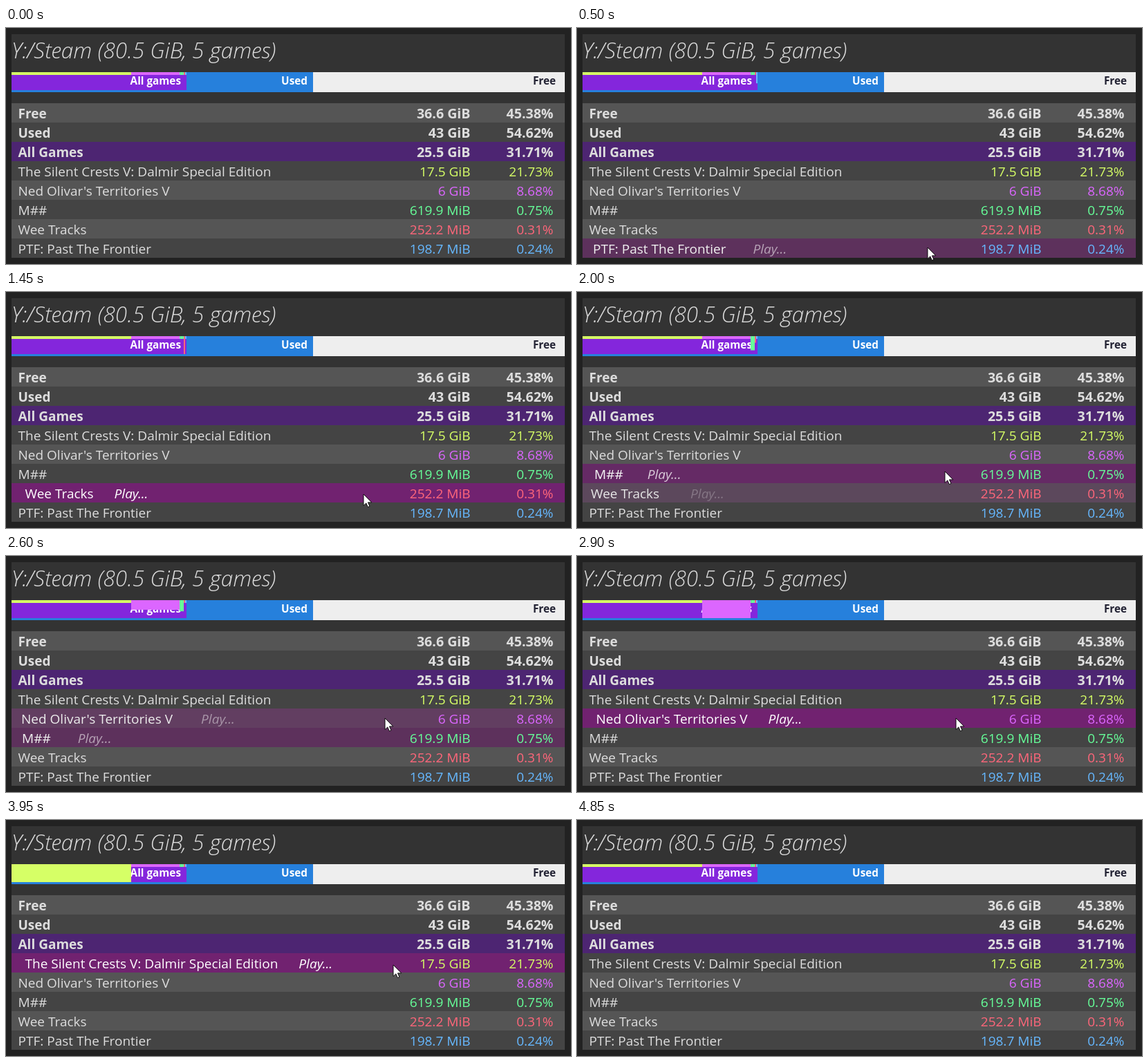
Write an HTML page that moves like this. It is 817 by 342 pixels and loops after 5.65 s.

```html
<!DOCTYPE html>
<html lang="en">
<head>
<meta charset="utf-8">
<title>Disk usage</title>
<style>
  html, body { margin: 0; width: 100%; height: 100%; overflow: hidden; background: #222; }
  svg { display: block; width: 817px; height: 342px; font: 19px "Open Sans", "Noto Sans", sans-serif; fill: #ddd; }
  .title { font-size: 31.55px; font-weight: 300; font-style: italic; }
  .bar { font-size: 15.3px; font-weight: 700; fill: #fff; }
  .total { font-weight: 700; }
  .total.end { font-size: 19.6px; }
  .end { text-anchor: end; }
  .play { font-style: italic; fill: #fff; }
</style>
</head>
<body>
<svg id="stage" viewBox="0 0 817 342"></svg>
<script>
const LOOP = 5650, STEP = 50, FADE = 500;
const ROW_TOP = 109, ROW_H = 28;
const THIN = 4, TALL = 26;
const LIGHT = "#555", DARK = "#444";

const totals = [
  ["Free", "36.6 GiB", "45.38%", LIGHT],
  ["Used", "43 GiB", "54.62%", DARK],
  ["All Games", "25.5 GiB", "31.71%", "#4d2572"]
];

// name, size, share, colour, bar left, bar right, hover start, hover end
const games = [
  ["The Silent Crests V: Dalmir Special Edition", "17.5 GiB", "21.73%", "#d6ff66", 8, 181, 3175, 4325],
  ["Ned Olivar's Territories V", "6 GiB", "8.68%", "#dc66ff", 181, 251, 2375, 3175],
  ["M##", "619.9 MiB", "0.75%", "#66ff99", 251, 257, 1625, 2375],
  ["Wee Tracks", "252.2 MiB", "0.31%", "#ff667a", 257, 259, 925, 1625],
  ["PTF: Past The Frontier", "198.7 MiB", "0.24%", "#66b8ff", 259, 261, 225, 925]
];

// time, x, y of the pointer tip
const moves = [
  [250, 505, 330], [300, 507, 318], [950, 517, 293], [1650, 532, 260],
  [2400, 548, 235], [3150, 553, 226], [3200, 560, 210], [4350, 798, 208]
];
const POINTER_OFF = 4400;

const stage = document.getElementById("stage");

function add(tag, attrs, parent = stage, text = "") {
  const el = document.createElementNS("http://www.w3.org/2000/svg", tag);
  for (const key in attrs) el.setAttribute(key, attrs[key]);
  el.textContent = text;
  return parent.appendChild(el);
}

const rect = (x, y, width, height, fill) => add("rect", { x, y, width, height, fill });
const label = (x, y, cls, text) => add("text", { x, y, class: cls }, stage, text);

rect(0, 0, 817, 342, "#222");
rect(8, 9, 800, 324, "#333");
label(8, 44, "title", "Y:/Steam (80.5 GiB, 5 games)");

rect(8, 64, 800, 29, "#eee");
rect(8, 64, 436, 29, "#2680dc");
rect(8, 64, 253, TALL, "#8426dc");
label(253, 82, "bar end", "All games");
label(436, 82, "bar end", "Used");
label(795, 82, "bar end", "Free").style.fill = "#223";

totals.forEach(([name, size, share, bg], i) => {
  const y = ROW_TOP + i * ROW_H;
  rect(8, y, 800, ROW_H, bg);
  label(17.5, y + 22, "total", name);
  label(671.5, y + 22, "total end", size);
  label(791.5, y + 22, "total end", share);
});

const rows = games.map(([name, size, share, color, left, right, enter, leave], i) => {
  const y = ROW_TOP + (totals.length + i) * ROW_H;
  rect(8, y, 800, ROW_H, i % 2 ? LIGHT : DARK);
  const glow = rect(8, y, 800, ROW_H, "#712270");
  const text = label(0, y + 22, "", "");
  add("tspan", {}, text, name);
  const play = add("tspan", { class: "play" }, text, "Play...");
  label(671.5, y + 22, "end", size).style.fill = color;
  label(791.5, y + 22, "end", share).style.fill = color;
  const strip = rect(left, 64, right - left, THIN, color);
  return { glow, text, play, strip, enter, leave };
});

const pointer = add("path", {
  d: "M0 0V16.5L3.8 12.9L6.3 18.6L8.9 17.5L6.4 11.9H11.7Z",
  fill: "#fff", stroke: "#000", "stroke-width": 0.9, "stroke-linejoin": "round"
});

const ramp = (t, from) => Math.min(1, Math.max(0, (t - from) / FADE));

function draw(t) {
  for (const r of rows) {
    const p = ramp(t, r.enter) - ramp(t, r.leave);
    const tone = Math.round(221 + 34 * p);
    r.glow.setAttribute("opacity", p);
    r.text.setAttribute("x", 17.5 + 10 * p);
    r.text.style.fill = `rgb(${tone},${tone},${tone})`;
    r.play.setAttribute("dx", 50 - 20 * p);
    r.play.setAttribute("fill-opacity", p);
    r.strip.setAttribute("height", THIN + (TALL - THIN) * p);
  }
  const spot = moves.filter(m => m[0] <= t).pop();
  const shown = spot && t < POINTER_OFF;
  pointer.setAttribute("visibility", shown ? "visible" : "hidden");
  if (shown) pointer.setAttribute("transform", `translate(${spot[1]} ${spot[2]})`);
}

const start = performance.now();
function tick() {
  const t = (performance.now() - start) % LOOP;
  draw(Math.floor(t / STEP) * STEP);
  requestAnimationFrame(tick);
}
tick();
</script>
</body>
</html>
```
